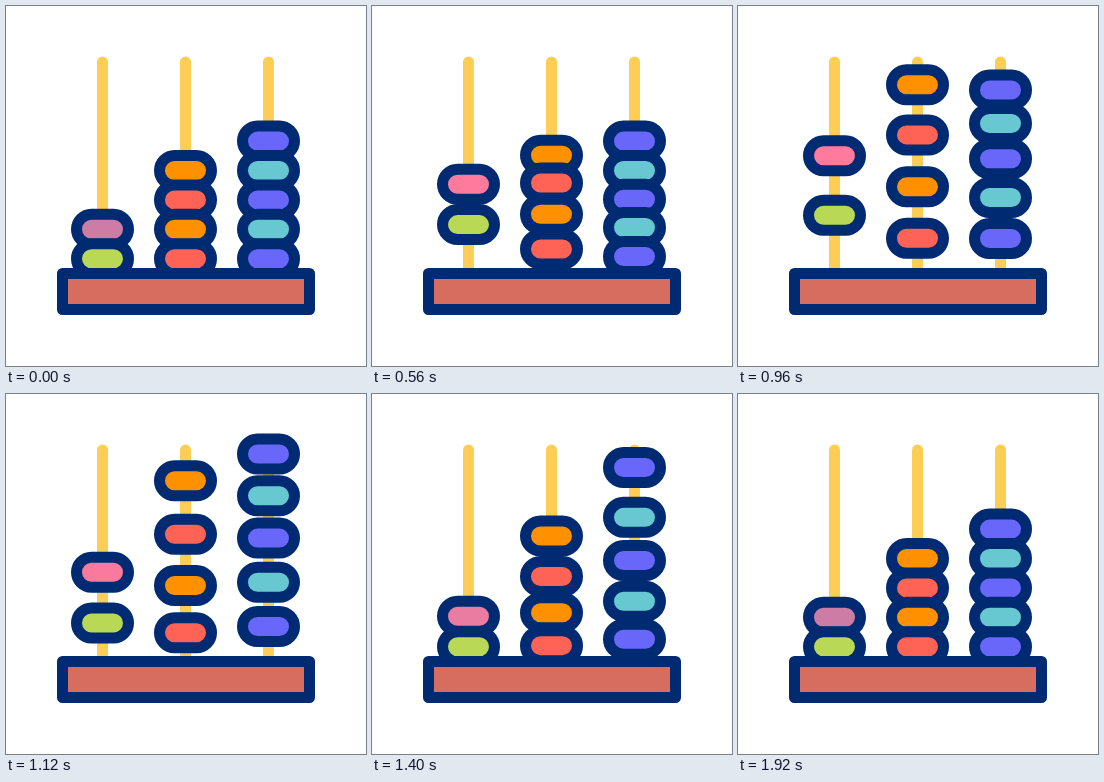
These frames come from a looping animation (360 px wide and 360 px high, 2000 ms). An HTML page:

```html
<!DOCTYPE html>
<html lang="en">
<head>
<meta charset="utf-8">
<title>Abacus</title>
<style>
  html, body { margin: 0; width: 100%; height: 100%; overflow: hidden; background: #fff; }
  svg { display: block; width: 100%; height: 100%; }
</style>
</head>
<body>
<svg id="stage" viewBox="0 0 360 360"></svg>
<script>
const LOOP = 2000, STEP = 40, RISE = 600;
const NAVY = '#002a72', YELLOW = '#fecd55';
const PINK = [255, 122, 157], MAUVE = [205, 124, 166];
const GREEN = '#b9d855', ORANGE = '#ff9100', RED = '#ff6355';
const PURPLE = '#6966fa', TEAL = '#67c8d2';

// Beads run from top to bottom: colour, lift in px, start in ms, optional fall time in ms.
const columns = [
  { x: 96.5, beads: [['pink', 82, 240], [GREEN, 52.6, 200]] },
  { x: 179.5, beads: [[ORANGE, 86.8, 400], [RED, 65, 360], [ORANGE, 43, 320], [RED, 21.5, 280]] },
  { x: 262.5, beads: [[PURPLE, 79, 600, 660], [TEAL, 63.5, 560], [PURPLE, 49.8, 520],
                      [TEAL, 35.5, 480], [PURPLE, 21.3, 440]] }
];

const stage = document.getElementById('stage');
function add(tag, attrs) {
  const el = document.createElementNS('http://www.w3.org/2000/svg', tag);
  for (const key in attrs) el.setAttribute(key, attrs[key]);
  return stage.appendChild(el);
}

const clamp = v => Math.min(1, Math.max(0, v));
const ease = u => u * u * (3 - 2 * u);

const beads = [];
for (const { x, beads: list } of columns) {
  add('line', { x1: x, x2: x, y1: 56, y2: 268, stroke: YELLOW,
                'stroke-width': 11, 'stroke-linecap': 'round' });
  list.forEach(([color, lift, start, fall = RISE], i) => {
    const el = add('rect', { x: x - 26, y: -15, width: 52, height: 30, rx: 15,
                             fill: color, stroke: NAVY, 'stroke-width': 11 });
    const restY = 252.7 - 29.4 * (list.length - 1 - i);
    beads.push({ el, color, lift, start, fall, restY });
  });
}
add('rect', { x: 56.5, y: 267.5, width: 247, height: 36, fill: '#d66d5e',
              stroke: NAVY, 'stroke-width': 11, 'stroke-linejoin': 'round' });

function pinkAt(t) {
  const fade = t < 240 ? 1 : clamp((t - 1040) / 840);
  return `rgb(${PINK.map((c, i) => Math.round(c + (MAUVE[i] - c) * fade))})`;
}

function draw(t) {
  for (const { el, color, lift, start, fall, restY } of beads) {
    const sinceStart = t - start;
    const u = sinceStart < RISE ? sinceStart / RISE : 1 - (sinceStart - RISE) / fall;
    el.setAttribute('transform', `translate(0 ${restY - lift * ease(clamp(u))})`);
    if (color === 'pink') el.setAttribute('fill', pinkAt(t));
  }
}

function frame() {
  const t = performance.now() % LOOP;
  draw(Math.floor(t / STEP) * STEP);
  requestAnimationFrame(frame);
}
frame();
</script>
</body>
</html>
```
